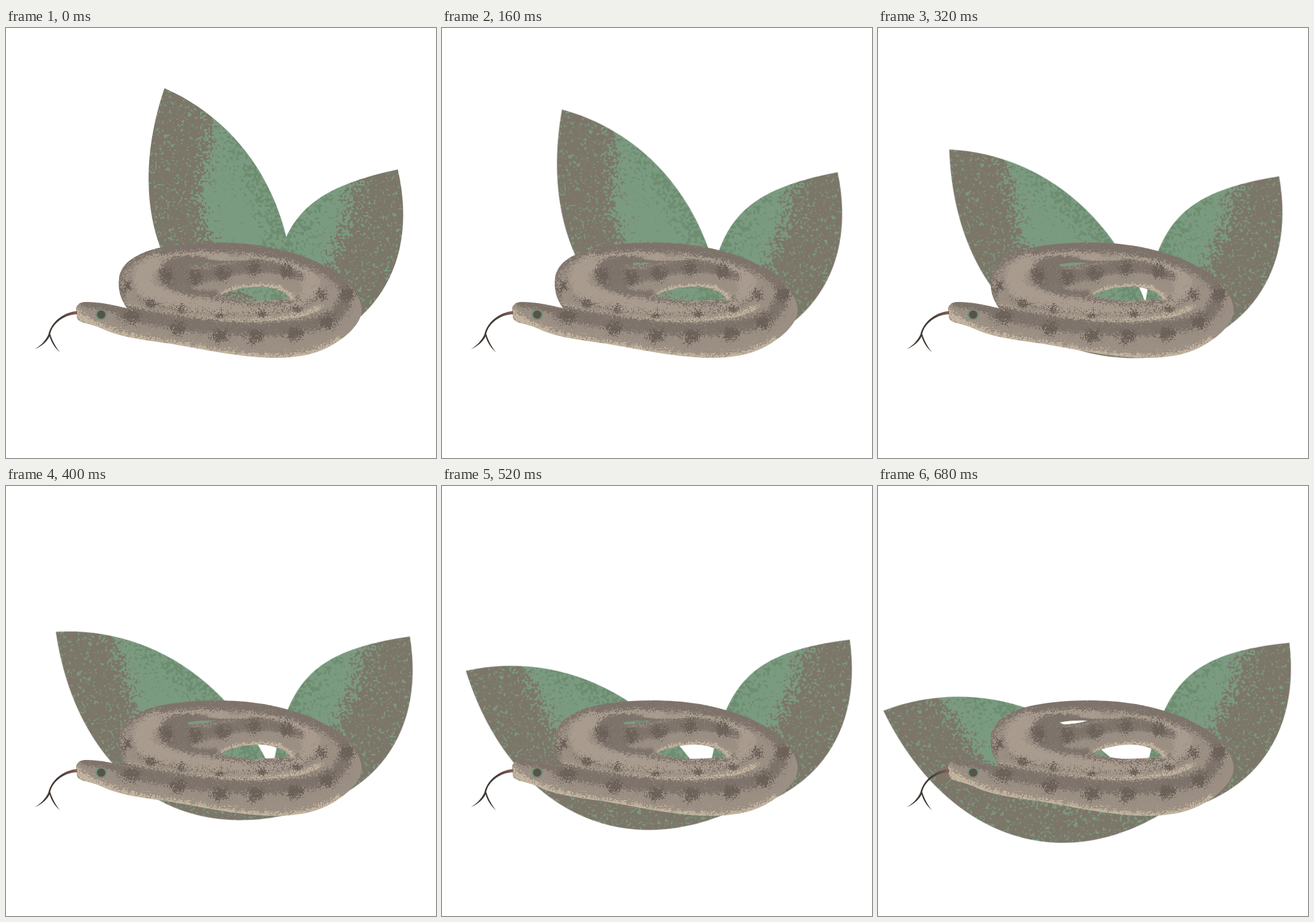
An HTML page with a canvas for the animation above (1920 ms loop, 700 px wide and 700 px high).

```html
<!DOCTYPE html>
<html lang="en">
<head>
<meta charset="utf-8">
<title>Snake and leaves</title>
<style>
  html, body { margin: 0; width: 100%; height: 100%; overflow: hidden; background: #fff; }
  canvas { display: block; width: 100vmin; height: 100vmin; }
</style>
</head>
<body>
<canvas id="stage" width="700" height="700"></canvas>
<script>
const SIZE = 700, LOOP = 1920, STEP = 40, MOVE = 680;
const C = {
  green: '#7a9b80', moss: '#6d8d70', bark: '#7c7669',
  skin: '#9b8f84', light: '#a99c8f', dark: '#7e736a', spot: '#6b6158', belly: '#c3b59f'
};

const stage = document.getElementById('stage').getContext('2d');

function layer() {
  const canvas = document.createElement('canvas');
  canvas.width = canvas.height = SIZE;
  return canvas.getContext('2d', { willReadFrequently: true });
}

function hash(x, y) {
  let h = Math.imul(x, 374761393) + Math.imul(y, 668265263);
  h = Math.imul(h ^ (h >>> 13), 1274126177);
  return ((h ^ (h >>> 16)) >>> 0) / 4294967296;
}

function noise(x, y) {
  const ix = Math.floor(x), iy = Math.floor(y);
  const smooth = v => v * v * (3 - 2 * v);
  const mix = (a, b, k) => a + (b - a) * k;
  const u = smooth(x - ix), v = smooth(y - iy);
  return mix(mix(hash(ix, iy), hash(ix + 1, iy), u),
             mix(hash(ix, iy + 1), hash(ix + 1, iy + 1), u), v);
}

const mask = layer();

// Blurs a drawing, turns its soft edge into grain and lays it inside what ctx already holds.
function grain(ctx, color, { blur = 4, cell = 1.4, alpha = 1 }, draw) {
  mask.clearRect(0, 0, SIZE, SIZE);
  mask.save();
  mask.filter = `blur(${blur}px)`;
  mask.globalAlpha = alpha;
  mask.lineCap = mask.lineJoin = 'round';
  draw(mask);
  mask.restore();
  const image = mask.getImageData(0, 0, SIZE, SIZE), px = image.data;
  for (let i = 3; i < px.length; i += 4) {
    if (!px[i]) continue;
    const n = (i - 3) / 4;
    const limit = (noise(n % SIZE / cell, Math.floor(n / SIZE) / cell) - 0.5) * 1.2 + 0.5;
    // A narrow ramp keeps the grains crisp without jagged corners.
    px[i] = 255 * Math.min(1, Math.max(0, (px[i] / 255 - Math.max(limit, 0.03)) * 5 + 0.5));
  }
  mask.putImageData(image, 0, 0);
  mask.save();
  mask.globalCompositeOperation = 'source-in';
  mask.fillStyle = color;
  mask.fillRect(0, 0, SIZE, SIZE);
  mask.restore();
  ctx.save();
  ctx.globalCompositeOperation = 'source-atop';
  ctx.drawImage(mask.canvas, 0, 0);
  ctx.restore();
}

const stroke = (ctx, color, width, d, options = {}) =>
  grain(ctx, color, options, m => { m.lineWidth = width; m.stroke(new Path2D(d)); });
const fill = (ctx, color, d, options = {}) =>
  grain(ctx, color, options, m => m.fill(new Path2D(d)));
const spots = (ctx, points, rx, ry) =>
  grain(ctx, C.spot, { blur: 4, alpha: 0.95 }, m => points.forEach(([x, y]) => {
    m.beginPath();
    m.ellipse(x, y, rx, ry, -0.3, 0, 7);
    m.fill();
  }));

function makeLeaf({ x, y, tilt, turn, outline, edge, edgeWidth, shade }) {
  const ctx = layer();
  ctx.translate(x, y);
  ctx.rotate(tilt * Math.PI / 180);
  ctx.fillStyle = C.green;
  ctx.fill(new Path2D(outline));
  ctx.resetTransform();
  stroke(ctx, C.moss, edgeWidth, edge, { blur: 22, cell: 3.4, alpha: 0.7 });
  fill(ctx, C.bark, shade, { blur: 15, cell: 2.8, alpha: 0.84 });
  return { x, y, turn, image: ctx.canvas };
}

const leaves = [
  makeLeaf({
    x: 459, y: 535, tilt: -24.7, turn: -44.7, edgeWidth: 56,
    outline: 'M0 0C-160 -130 -148 -325 0 -481C112 -355 118 -165 0 0Z',
    edge: 'M385 175C425 230 445 290 460 350L459 535',
    shade: 'M150 40H310L340 160L319 250L324 320L346 380L390 440L480 560H150Z'
  }),
  makeLeaf({
    x: 424, y: 537, tilt: 34.88, turn: 6.2, edgeWidth: 50,
    outline: 'M0 0C-106 -170 -130 -235 0 -374C128 -258 118 -110 0 0Z',
    edge: 'M500 275C475 300 455 330 445 370L424 537',
    shade: 'M572 170H720V600H430L490 440L525 380L548 330L565 255Z'
  })
];

function drawBack(ctx) {
  ctx.fillStyle = C.skin;
  ctx.fill(new Path2D(
    'M114 461C113 452 119 446 130 446C155 446 178 452 197 456C186 442 182 424 184 408' +
    'C186 385 208 368 248 358C300 347 365 346 420 355C470 364 520 382 548 407' +
    'C568 424 580 445 579 461C577 485 548 508 522 521C500 532 470 537 440 537' +
    'C385 537 325 524 268 514C225 508 185 503 160 491C150 486 135 482 126 480' +
    'C116 477 115 472 115 467Z' +
    'M349 435C368 426 390 421 412 421C436 421 455 431 463 440C440 443 420 444 400 444C378 443 362 438 349 435Z' +
    'M295 385Q315 381 341 382Q322 388 297 388Z'), 'evenodd');
  stroke(ctx, C.light, 30, 'M350 373C280 362 226 375 222 405C220 440 280 449 350 455C430 460 500 445 497 412C490 395 450 385 400 376');
  stroke(ctx, C.dark, 16, 'M250 358C180 375 175 410 188 440', { blur: 6, alpha: 0.85 });
  stroke(ctx, C.dark, 8, 'M215 440C240 453 290 460 347 466C420 470 500 458 519 425', { alpha: 0.6 });
  spots(ctx, [[197, 420], [235, 450], [285, 460], [347, 471], [417, 467], [474, 458], [513, 434]], 9, 9);
  stroke(ctx, C.belly, 8, 'M198 452C240 465 300 472 350 476C420 481 480 472 512 455', { blur: 3, alpha: 0.9 });
}

function drawInnerCoil(ctx) {
  fill(ctx, C.dark, 'M248 402C248 380 268 369 300 370C335 373 370 380 400 376C440 377 480 390 488 408C480 416 450 402 405 402C360 405 330 418 350 437C310 440 248 430 248 402Z', { blur: 3 });
  stroke(ctx, C.skin, 15, 'M310 422C340 422 365 408 405 406C440 404 462 412 476 427');
  stroke(ctx, C.dark, 9, 'M275 424C320 435 370 444 400 448C430 450 460 447 475 441', { alpha: 0.85 });
  stroke(ctx, C.belly, 6, 'M352 432C370 422 412 416 438 421C453 425 463 434 467 440', { blur: 2, alpha: 0.9 });
  stroke(ctx, C.light, 5, 'M330 374Q360 379 405 373', { blur: 2 });
  stroke(ctx, C.skin, 4, 'M300 391Q340 390 375 380', { blur: 2, alpha: 0.8 });
  spots(ctx, [[262, 403], [308, 406], [353, 400], [403, 391], [458, 396]], 11, 12);
}

function drawFront(ctx) {
  ctx.save();
  ctx.globalCompositeOperation = 'source-atop';
  ctx.fillStyle = C.skin;
  ctx.fill(new Path2D(
    'M130 446C160 446 190 456 215 461C260 466 300 473 340 478C400 482 450 480 490 468' +
    'C515 460 530 446 527 432C524 415 505 400 480 388L560 380L620 460L540 550H90V440Z'));
  ctx.restore();
  stroke(ctx, C.belly, 12, 'M114 462C122 478 150 486 180 498C200 505 240 511 268 515C325 525 385 538 440 538C485 538 515 527 548 508');
  stroke(ctx, C.dark, 20, 'M252 360C300 350 400 352 470 372C520 387 552 408 556 432');
  stroke(ctx, C.dark, 23, 'M553 425C561 462 520 482 470 487C400 495 330 488 260 476C230 470 205 466 190 463');
  stroke(ctx, C.dark, 14, 'M128 449C155 449 180 458 215 468', { blur: 3 });
  spots(ctx, [[205, 470], [280, 488], [348, 501], [406, 502], [470, 497], [524, 479], [556, 434]], 14, 11);
}

function drawFace(ctx) {
  ctx.fillStyle = '#5c5149';
  ctx.strokeStyle = '#6f9179';
  ctx.lineWidth = 2.4;
  ctx.beginPath();
  ctx.arc(155, 466.5, 8, 0, 7);
  ctx.fill();
  ctx.stroke();
  const tongue = ctx.createLinearGradient(116, 0, 85, 0);
  tongue.addColorStop(0, '#8a5f58');
  tongue.addColorStop(1, '#403934');
  ctx.fillStyle = tongue;
  ctx.fill(new Path2D(
    'M116 461C94 462 73 479 69 499C64 510 56 517 47 523C60 517 67 510 71 502' +
    'C74 512 79 520 88 528C80 518 75 508 72 498C76 480 96 466 116 466Z'));
}

const snake = layer();
drawBack(snake);
drawInnerCoil(snake);
drawFront(snake);
drawFace(snake);

// Cubic ease with handles (1/6, 0) and (5/6, 1).
function ease(p) {
  let low = 0, high = 1;
  for (let i = 0; i < 24; i++) {
    const s = (low + high) / 2, r = 1 - s;
    const x = 0.5 * s * r * r + 2.5 * s * s * r + s * s * s;
    if (x < p) low = s; else high = s;
  }
  return low * low * (3 - 2 * low);
}

function render(time) {
  const t = Math.floor(time % LOOP / STEP) * STEP;
  const progress = ease(Math.min(t / MOVE, 1));
  stage.fillStyle = '#fff';
  stage.fillRect(0, 0, SIZE, SIZE);
  for (const { x, y, turn, image } of leaves) {
    stage.save();
    stage.translate(x, y);
    stage.rotate(turn * progress * Math.PI / 180);
    stage.drawImage(image, -x, -y);
    stage.restore();
  }
  stage.drawImage(snake.canvas, 0, 0);
}

let start;
function tick(now) {
  start ??= now;
  render(now - start);
  requestAnimationFrame(tick);
}
render(0);
requestAnimationFrame(tick);
</script>
</body>
</html>
```
